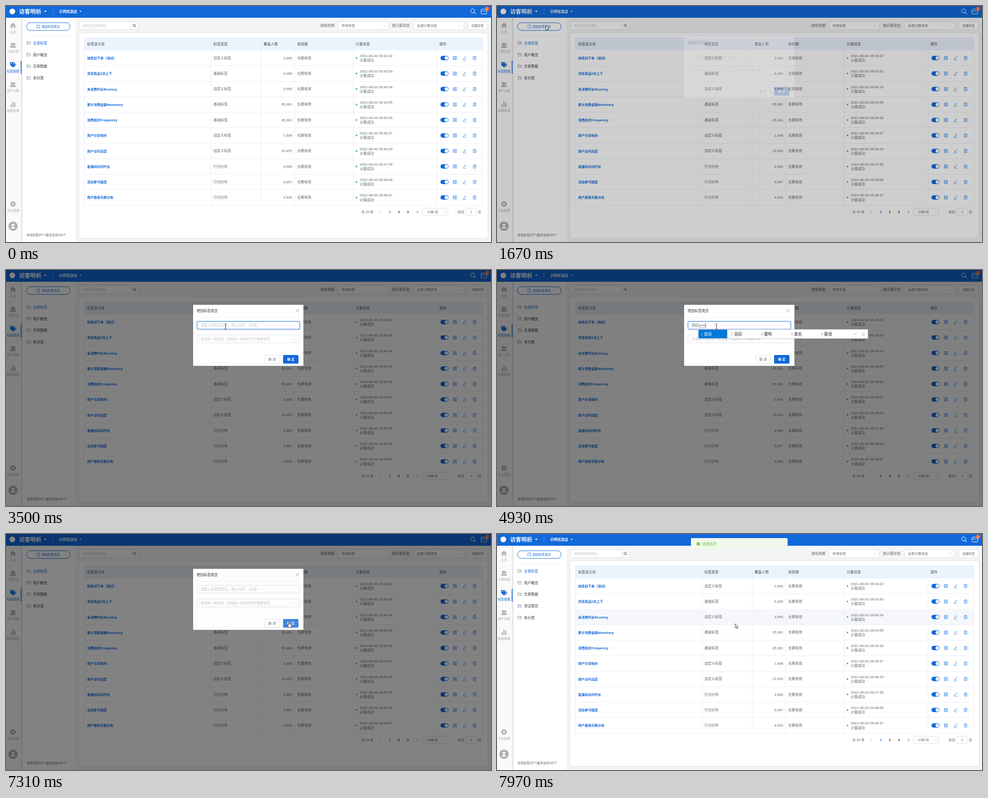
Recreate the animation shown at these times as an HTML page with a canvas. Size 1073 px wide and 522 px high, loop 8 s.

```html
<!DOCTYPE html>
<html lang="zh-CN">
<head>
<meta charset="utf-8">
<title>标签管理</title>
<style>
html, body { margin: 0; width: 100%; height: 100%; overflow: hidden; background: #f4f5f7; }
canvas { display: block; width: 1073px; height: 522px; }
</style>
</head>
<body>
<canvas id="stage" width="1073" height="522"></canvas>
<script>
const LOOP = 8000, W = 1073, H = 522;
const BLUE = '#1169da', TEXT = '#606266', DARK = '#303133', PALE = '#c0c4cc', LINE = '#dcdfe6', GREY = '#b3b5b8';
const CJK = '"Noto Sans CJK SC", "Noto Sans CJK", sans-serif';
const FONT = `"Liberation Sans", ${CJK}`, NAME_FONT = `"Open Sans", ${CJK}`;
const screen = document.getElementById('stage').getContext('2d');
const layer = Object.assign(document.createElement('canvas'), { width: W, height: H }).getContext('2d');
let g = screen;

// ---------- helpers ----------
const clamp = v => Math.max(0, Math.min(1, v));
const inside = (p, x0, y0, x1, y1) => p.x >= x0 && p.x < x1 && p.y >= y0 && p.y < y1;

// CSS "ease" curve
function ease(x) {
  x = clamp(x);
  let lo = 0, hi = 1;
  for (let i = 0; i < 18; i++) {
    const s = (lo + hi) / 2;
    if (.75 * s * (1 - s) + s * s * s < x) lo = s; else hi = s;
  }
  return .3 * lo * (1 - lo) ** 2 + 3 * lo * lo * (1 - lo) + lo ** 3;
}
function text(str, x, y, size = 7.8, color = TEXT, weight = 400, align = 'left', family = FONT) {
  g.font = `${weight} ${size}px ${family}`;
  g.textAlign = align;
  g.fillStyle = color;
  g.fillText(str, x, y + size * .37);
}
function rect(x, y, w, h, color) {
  g.fillStyle = color;
  g.fillRect(x, y, w, h);
}
function box(x, y, w, h, r, fill, stroke) {
  g.beginPath();
  g.roundRect(x, y, w, h, r);
  if (fill) { g.fillStyle = fill; g.fill(); }
  if (stroke) { g.strokeStyle = stroke; g.lineWidth = 1; g.stroke(); }
}
function disc(x, y, r, color) {
  g.beginPath();
  g.arc(x, y, r, 0, Math.PI * 2);
  g.fillStyle = color;
  g.fill();
}
function path(d, x, y, { fill, stroke, width = 1 }) {
  const shape = new Path2D(d);
  g.save();
  g.translate(x, y);
  if (fill) { g.fillStyle = fill; g.fill(shape); }
  if (stroke) { g.strokeStyle = stroke; g.lineWidth = width; g.stroke(shape); }
  g.restore();
}
const chevron = (x, y, color = PALE) => path('M-2.8-1.4L0 1.4 2.8-1.4', x, y, { stroke: color, width: .8 });
const magnifier = (x, y, s, color, width) => {
  g.beginPath();
  g.arc(x - s * .15, y - s * .15, s, 0, 7);
  g.moveTo(x + s * .6, y + s * .6);
  g.lineTo(x + s * 1.5, y + s * 1.5);
  g.strokeStyle = color;
  g.lineWidth = width;
  g.stroke();
};

// ---------- page ----------
function topBar() {
  rect(0, 0, W, 26, BLUE);
  disc(14, 12, 6.3, '#fff');
  text('访客明析', 29, 12, 12.3, '#fff', 700);
  path('M-3-1.5H3L0 1.8Z', 87, 12, { fill: '#fff' });
  rect(103.5, 6, 1, 12, 'rgba(255,255,255,.35)');
  text('示例优选店', 117.5, 12, 8, '#fff', 700);
  path('M-2.3-1.2H2.3L0 1.4Z', 165, 12, { fill: '#fff' });
  magnifier(1033, 11.5, 4.3, '#fff', 1.1);
  box(1051, 7, 12.5, 10.5, 1.5, null, '#fff');
  path('M-6-1H-2.5Q0 2 2.5-1H6', 1057.2, 11.5, { stroke: '#fff' });
  disc(1064.3, 6.2, 4.8, '#f4693b');
  text('1', 1064.3, 6.2, 7, '#fff', 400, 'center');
}
function people(x, y) {
  disc(x + 2.6, y - 2.4, 2.7, GREY);
  path('M0 5Q1 .7 3 .7Q6.7 1 6.7 5Z', x, y, { fill: GREY });
  disc(x - 1.6, y - 2.6, 3.2, GREY);
  path('M-7 5.3Q-6.6.8-1.6.8Q3.2.8 3.5 5.3Z', x, y, { fill: GREY });
}
function gear(x, y) {
  g.strokeStyle = GREY;
  g.lineWidth = 3.2;
  g.beginPath(); g.arc(x, y, 3.6, 0, 7); g.stroke();
  g.lineWidth = 2;
  g.setLineDash([2.5, 1.87]);
  g.beginPath(); g.arc(x, y, 5.56, 0, Math.PI * 2); g.stroke();
  g.setLineDash([]);
}
function navRail() {
  rect(0, 26, 35, H, '#fafafa');
  const shade = g.createLinearGradient(33, 0, 37, 0);
  shade.addColorStop(0, '#f2f2f3');
  shade.addColorStop(.5, '#dddee0');
  shade.addColorStop(1, '#fff');
  rect(33, 26, 4, H, shade);
  const x = 15.5;
  path('M-6.8 .3L0-6.3 6.8 .3H4.8V6H1.6V2H-1.6V6H-4.8V.3Z', x, 43, { fill: GREY });
  people(x, 87);
  path('M-6.3-5.5L-.5-6 5 .2-.3 5.7-6 .2Z', x - .3, 130, { fill: BLUE });
  path('M1.3-6L6.8 .2 1.5 5.7', x - .3, 130, { stroke: BLUE, width: 1.2 });
  disc(x - 3.3, 127.2, 1.1, '#fafafa');
  people(x, 174);
  [[-5.5, 4.5], [-1.3, 11], [2.9, 7.5]].forEach(([dx, h]) => rect(x + dx, 222 - h, 2.6, h, GREY));
  rect(x - 6.5, 222.6, 13, 1, GREY);
  gear(x, 438);
  [['主页', 57], ['人群实验', 100], ['标签管理', 144], ['用户分群', 187.5], ['数据管理', 231.5], ['平台管理', 452]]
    .forEach(([s, y]) => text(s, x, y, 6.8, y === 144 ? BLUE : '#a8aaad', y === 144 ? 500 : 400, 'center'));
  rect(32.6, 121, 1.7, 29, BLUE);
  disc(x, 487, 10.3, '#adb0b5');
  disc(x, 484.3, 2.9, '#fff');
  path('M-5 4.5Q-4.5 .9 0 .9T5 4.5Z', x, 487.5, { fill: '#fff' });
}
function folders(t) {
  rect(37, 26, 116.5, H, '#fff');
  box(45.4, 37, 96.4, 17, 8.5, '#fff', BLUE);
  path('M-.5 3H-3V-3H3V.2M1 3H4.2M2.6 1.4V4.6', 71.3, 45.2, { stroke: BLUE, width: .8 });
  text('增加标签类目', 78.8, 45.3, 6.75, BLUE);
  rect(45, 65, 97, 1, '#ebeef5');
  const names = ['全部标签', '用户概览', '交易数据', '未分类'];
  if (t >= 7500) names.splice(3, 0, '测试类目');
  names.forEach((name, i) => {
    const y = 82 + i * 25.75;
    path('M-3.8 3.3V-3.3H-.8L.2-2H3.8V3.3ZM-3.8-.6H3.8', 50, y - .3, { stroke: '#85888e', width: .8 });
    text(name, 59.8, y, 7.85, i ? DARK : BLUE);
  });
  text('有效标签29个/最多支持200个', 45.5, 507, 6.7);
}
function select(x, w, label) {
  box(x + .5, 34.5, w, 17.5, 2, '#fff', LINE);
  text(label, x + 8.3, 43.3, 7.35);
  chevron(x + w - 9, 43.7);
}
function filters() {
  box(162.5, 34.5, 130.5, 17.5, 2, '#fff', LINE);
  rect(275, 35, 1, 17, LINE);
  text('按标签名称查找...', 170.5, 43.5, 7.27, PALE);
  magnifier(283.8, 43.2, 2.6, DARK, .9);
  text('按有效期', 695.5, 43.3);
  select(734.5, 111, '所有标签');
  text('按计算状态', 854, 43.3);
  select(901, 111.5, '全部计算状态');
  box(1021.5, 34.5, 43.5, 17.5, 2, '#fff', LINE);
  text('创建标签', 1043.3, 43.3, 6.8, TEXT, 400, 'center');
}

const ROW = 34.26, TOP = 98;
const rows = [
  ['按性别下单（测试）', '自定义标签', '2,569', '43:22'],
  ['浏览商品5次上下', '基础标签', '6,285', '43:53'],
  ['未消费时长Recency', '自定义标签', '3,565', '44:24'],
  ['累计消费金额Monetary', '基础标签', '35,381', '44:55'],
  ['消费频次Frequency', '基础标签', '35,381', '45:26'],
  ['用户分享倾向', '自定义标签', '1,908', '45:57'],
  ['用户访问深度', '自定义标签', '15,453', '46:29'],
  ['直播间访问时长', '行为分布', '4,585', '47:35'],
  ['活动参与程度', '行为分布', '5,697', '48:06'],
  ['用户登录天数分布', '行为分布', '4,535', '48:37']
];
// Fade amount: share of the last 250 ms the pointer spent on the row
function rowHover(i, t) {
  let hits = 0;
  for (let k = 0; k < 10; k++) {
    const s = t - k * 25;
    const covered = s > 1620 && s < 7480;
    if (s > 0 && !covered && inside(pointer(s), 173, TOP + i * ROW, 1054, TOP + (i + 1) * ROW)) hits++;
  }
  return hits / 10;
}
function actions(y) {
  const c = '#3d8ee8';
  box(961.2, y - 4.8, 17.8, 9.6, 4.8, BLUE);
  disc(974.2, y, 3.8, '#fff');
  for (const dx of [-3.6, .9]) for (const dy of [-3.6, .9]) {
    g.strokeStyle = c;
    g.lineWidth = .9;
    g.strokeRect(993 + dx, y + dy, 2.7, 2.7);
  }
  path('M-2.6 1.8L2.3-3.6 3.3-2.6-1.4 2.4-2.8 2.8ZM-3.8 4.2H4', 1014.4, y, { stroke: c, width: .8 });
  path('M-3.8-2.6H3.8M-1.3-2.6V-4H1.3V-2.6M-2.9-2.4V3.9H2.9V-2.4M-1-.8V2.4M1-.8V2.4', 1036.7, y, { stroke: c, width: .9 });
}
function table(t) {
  g.save();
  g.shadowColor = 'rgba(0,0,0,.1)';
  g.shadowBlur = 4;
  rect(162, 60, 903.5, 453, '#fff');
  g.restore();
  rect(173, 70.5, 881, 27.5, '#ebf3fd');
  [['标签显示名', 179.5], ['标签类型', 459], ['覆盖人数', 570], ['有效期', 644.3], ['计算状态', 773.8], ['操作', 959]]
    .forEach(([s, x]) => text(s, x, 84.3, 7.8, '#45484d'));
  rows.forEach(([name, kind, count, time], i) => {
    const top = TOP + i * ROW, y = top + 17.1;
    const hover = rowHover(i, t);
    if (hover) {
      g.globalAlpha = hover;
      rect(173, top, 881, ROW, '#f5f7fa');
      g.globalAlpha = 1;
    }
    rect(173, Math.round(top + ROW) - .5, 881, 1, '#ebeef5');
    text(name, 179.5, y + .2, 7.27, BLUE, 700, 'left', NAME_FONT);
    text(kind, 459, y - .3);
    text(count, 633, y - .3, 7.8, TEXT, 400, 'right');
    text('长期有效', 644.3, y - .3);
    disc(775.4, y, 1.8, '#2fb696');
    text('2021-06-02 09:' + time, 782.8, y - 4.9);
    text('计算成功', 782.8, y + 5.2);
    actions(y);
  });
  [173, 453, 564, 638, 768, 953, 1054].forEach(x => rect(x, 70.5, 1, 370, '#e8ecf3'));
  rect(173, 70, 881, 1, '#e8ecf3');
}
function pager() {
  const y = 455.2;
  text('共 29 条', 786, y, 7.4);
  path('M1.3-2.6L-1.3 0 1.3 2.6', 827, y, { stroke: '#a0a3a9', width: .8 });
  ['1', '2', '3'].forEach((s, i) => text(s, 849 + i * 20, y, 7.4, i ? DARK : BLUE, 700, 'center'));
  path('M-1.3-2.6L1.3 0-1.3 2.6', 910.3, y, { stroke: DARK, width: .9 });
  box(921.5, 447.5, 56, 15.5, 2, '#fff', LINE);
  text('10条/页', 931.2, y + .3, 7.3);
  chevron(970, y + .3);
  text('前往', 999, y + .3, 7.4);
  box(1016.5, 447.5, 25, 15.5, 2, '#fff', LINE);
  text('1', 1029.2, y + .3, 7.4, TEXT, 400, 'center');
  text('页', 1044, y + .3, 7.4);
}

// ---------- typing ----------
// time, committed text, pinyin, candidates, candidate bar width
const typing = [
  [2450, '', ''],
  [3560, '', 'c', '从才次出吃车长', 305],
  [3640, '', 'ce', '测策侧册厕恻', 305],
  [3830, '', "ce's", '测试 测算 测速 侧身 侧室', 376],
  [3940, '', "ce'sh", '测试 侧室 策士 测时 侧视', 376],
  [4030, '', "ce'shi", '测试 侧室 策士 测时 侧视', 376],
  [4120, '测试', ''],
  [4380, '测试', 'l', '了来里老两龙路', 305],
  [4550, '测试', 'le', '了乐勒肋仂叻', 305],
  [4710, '测试', 'lei', '类累雷泪勒垒', 305],
  [4930, '测试', "lei'm", '类目 泪目 雷鸣 类名 雷母', 376],
  [5170, '测试', "lei'mu", '类目 泪目 雷姆 雷母 泪幕', 376],
  [5365, '测试类目', '']
];
const INPUT = 7.5;
function candidateBar(x, list, w) {
  g.save();
  g.shadowColor = 'rgba(0,0,0,.2)';
  g.shadowBlur = 2;
  box(x + .5, 131.5, w - 1, 20, 0, '#fff');
  g.restore();
  box(x + .5, 131.5, w - 1, 20, 0, null, '#d0d0d0');
  const words = list.includes(' ') ? list.split(' ') : [...list];
  const slot = (w - 44) / words.length;
  rect(x + 1, 132, slot - 3, 19, '#0078d7');
  words.forEach((word, i) => {
    text(i + 1, x + 6 + i * slot, 141.5, 7, i ? '#888' : '#fff');
    text(word, x + 13 + i * slot, 141.5, 8.8, i ? '#222' : '#fff');
  });
  chevron(x + w - 28, 141.5, '#777');
  text('☺', x + w - 15, 141.5, 9, '#777');
}
function inputContent(t) {
  const step = typing.filter(s => s[0] <= t).pop();
  const [since, done, pinyin, list, w] = step || [0, '', ''];
  if (t >= CLOSE || !(done || pinyin)) text('请输入标签类目名，限1-20字。（必填）', 430.6, 122.3, INPUT, PALE);
  else text(done + pinyin, 430.6, 122.3, INPUT);
  if (!step || t >= 7030) return;
  g.font = `${INPUT}px ${FONT}`;
  const start = 430.6 + g.measureText(done).width;
  const end = start + g.measureText(pinyin).width;
  if (Math.floor((t - since) / 530) % 2 === 0) rect(Math.round(end), 117, .8, 10, '#222');
  if (pinyin) {
    rect(start, 127, end - start, .7, '#777');
    candidateBar(Math.round(start) - 1, list, w);
  }
}

// ---------- dialog and toast ----------
const OPEN = 1623, CLOSE = 7304, TOAST = 7324;
function dialog(t) {
  box(414, 77, 244, 135, 1, '#fff');
  text('增加标签类目', 421.5, 90.3, 7.8, DARK);
  path('M-3.3-3.3L3.3 3.3M3.3-3.3L-3.3 3.3', 644.5, 90, { stroke: '#85888e', width: .8 });
  rect(422, 104, 228, 1, '#eef0f4');
  box(422.5, 113.5, 227.5, 17.5, 2, '#fff', LINE);
  const focus = ease((t - 2440) / 200) * (1 - ease((t - 7030) / 200));
  g.globalAlpha = focus;
  box(422.5, 113.5, 227.5, 17.5, 2, null, BLUE);
  g.globalAlpha = 1;
  box(422.5, 143.5, 227.5, 17.5, 2, '#fff', LINE);
  text('请选择一级类目，如创建一级类目则不需要选择', 430.6, 152.7, 7.3, PALE);
  chevron(641, 152.8);
  box(572.5, 188.5, 33, 18, 2, '#fff', LINE);
  text('取 消', 588.8, 197.8, 7.2, TEXT, 400, 'center');
  box(613, 188, 34, 19, 2, onConfirm(t) ? '#4187e1' : BLUE);
  text('确 定', 630, 197.8, 7.2, '#fff', 700, 'center');
  inputContent(t);
}
function modal(t) {
  if (t < OPEN || t > CLOSE + 300) return;
  const progress = ms => t < CLOSE ? ease((t - OPEN) / ms) : 1 - ease((t - CLOSE) / ms);
  rect(0, 0, W, H, `rgba(0,0,0,${.5 * progress(200)})`);
  const shown = progress(300);
  g = layer;
  g.clearRect(0, 0, W, H);
  dialog(t);
  g = screen;
  g.globalAlpha = shown;
  g.drawImage(layer.canvas, 0, Math.round(-11.2 * (1 - shown)));
  g.globalAlpha = 1;
}
function toast(t) {
  const age = t - TOAST;
  if (age < 0) return;
  g.save();
  g.globalAlpha = ease(age / 300);
  g.translate(0, -26 * (1 - ease(age / 400)));
  box(429, 9, 214, 26, 2, '#e1f3d8');
  box(429.6, 9.6, 212.8, 24.8, 2, '#f0f9eb');
  disc(445.3, 22, 3.7, '#67c23a');
  path('M-1.8 0L-.4 1.4 1.9-1.2', 445.3, 22, { stroke: '#fff', width: .9 });
  text('创建成功', 454, 22.2, 7.9, '#67c23a');
  g.restore();
}

// ---------- pointer ----------
const route = [
  [20, 500, 530], [200, 420, 405], [400, 310, 278], [600, 215, 180], [810, 134, 104], [1000, 117, 62],
  [1200, 106, 40], [1380, 108, 43.5], [1800, 108, 43.5], [1900, 190, 62], [2050, 370, 104],
  [2200, 470, 122], [2260, 485.5, 125], [6220, 485.5, 125], [6330, 560, 152], [6460, 608, 171],
  [6620, 624, 189], [6980, 626, 194.5], [7480, 626, 194.5], [7820, 567, 195.5], [7970, 527, 198.5]
];
function pointer(t) {
  const i = route.findIndex(p => p[0] > t);
  if (i <= 0) {
    const [, x, y] = i ? route[route.length - 1] : route[0];
    return { x, y };
  }
  const [t0, x0, y0] = route[i - 1], [t1, x1, y1] = route[i];
  const f = (t - t0) / (t1 - t0);
  return { x: x0 + (x1 - x0) * f, y: y0 + (y1 - y0) * f };
}
function onConfirm(t) {
  return inside(pointer(t), 613, 188, 647, 207);
}
function drawPointer(t) {
  const p = pointer(t);
  const open = t > 1660 && t < 7480;
  const hand = open
    ? onConfirm(t) || inside(p, 422, 143, 651, 161)
    : t < OPEN && inside(p, 45, 37, 142, 54);
  const ink = { fill: '#fff', stroke: '#111', width: .8 };
  if (open && inside(p, 422, 113, 651, 132)) {
    path('M-2-5.7Q0-5.7 0-4.8Q0-5.7 2-5.7M0-4.8V4.8M-2 5.7Q0 5.7 0 4.8Q0 5.7 2 5.7', p.x, p.y, { stroke: '#111', width: .9 });
  } else if (hand) {
    path('M-1 .8Q0-.6 1 .8V4.6Q2.1 3.8 2.8 5Q3.9 4.4 4.3 5.5Q5.7 5.2 5.6 6.8V9.2L4.5 11V12.6H-1.3V11L-3.8 7.4Q-3.7 6-2.4 6.5L-1 8Z', p.x, p.y, ink);
  } else {
    path('M0 0V9.4L2.2 7.4 3.7 11 5.2 10.3 3.7 6.9H6.7Z', p.x, p.y, ink);
  }
}

function draw(t) {
  rect(0, 0, W, H, '#f4f5f7');
  navRail();
  folders(t);
  filters();
  table(t);
  pager();
  topBar();
  modal(t);
  toast(t);
  drawPointer(t);
}
const began = performance.now();
function tick() {
  draw((performance.now() - began) % LOOP);
  requestAnimationFrame(tick);
}
tick();
</script>
</body>
</html>
```
